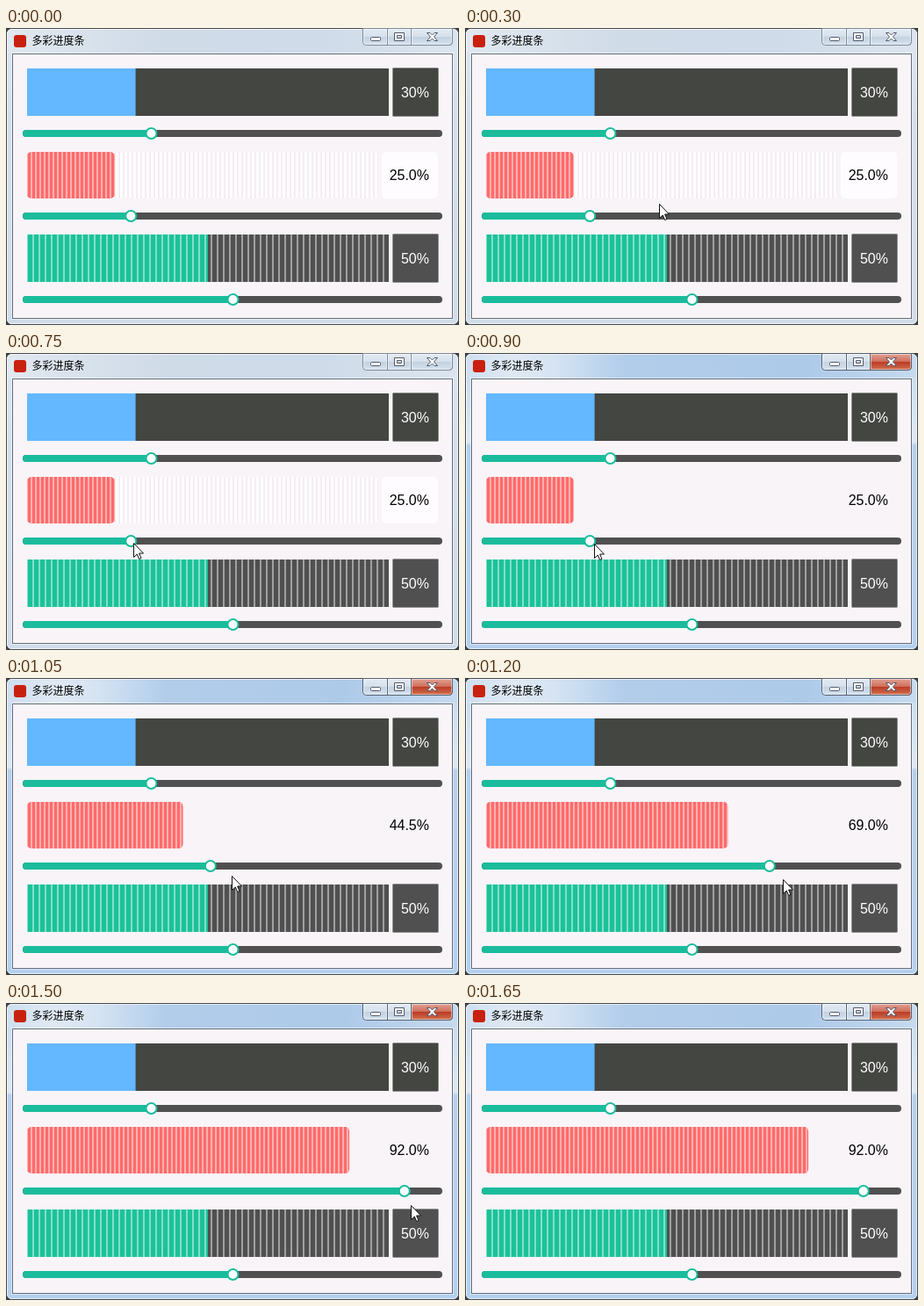
Recreate the animation shown at these times as an HTML page. Size 516 px wide and 338 px high, loop 2.1 s.

```html
<!DOCTYPE html>
<html lang="zh">
<head>
<meta charset="utf-8">
<style>
html, body { margin: 0; width: 516px; height: 338px; overflow: hidden; background: #3a3c40; }
svg { display: block; }
.pct { font: 16px "Liberation Sans", Arial, sans-serif; text-anchor: end; }
.title { font: 12px "Noto Sans CJK SC", "Noto Sans CJK", sans-serif; }
</style>
</head>
<body>
<svg width="516" height="338" viewBox="0 0 516 338">
  <defs>
    <linearGradient id="idleSide" x2="0" y2="1">
      <stop stop-color="#dde7f1"/><stop offset=".3" stop-color="#d3dfeb"/><stop offset="1" stop-color="#d0dde9"/>
    </linearGradient>
    <linearGradient id="idleTop">
      <stop stop-color="#e0e8f0"/><stop offset=".35" stop-color="#d0dbe8"/>
      <stop offset=".7" stop-color="#cfdbe9"/><stop offset="1" stop-color="#dce5ef"/>
    </linearGradient>
    <linearGradient id="activeSide" x2="0" y2="1">
      <stop stop-color="#c5d9ee"/><stop offset=".3" stop-color="#dce8f5"/>
      <stop offset=".31" stop-color="#b6d0ec"/><stop offset="1" stop-color="#b4d0ee"/>
    </linearGradient>
    <linearGradient id="activeTop">
      <stop stop-color="#cfdff0"/><stop offset=".1" stop-color="#dfe9f4"/><stop offset=".2" stop-color="#d5e3f2"/>
      <stop offset=".35" stop-color="#b2cdea"/><stop offset=".75" stop-color="#adcae9"/><stop offset="1" stop-color="#c6daef"/>
    </linearGradient>
    <linearGradient id="button" x2="0" y2="1">
      <stop stop-color="#e3ebf4"/><stop offset=".5" stop-color="#d5e0ec"/>
      <stop offset=".5" stop-color="#c3d1e0"/><stop offset="1" stop-color="#d6e2ef"/>
    </linearGradient>
    <linearGradient id="closeRed" x2="0" y2="1">
      <stop stop-color="#e2a497"/><stop offset=".48" stop-color="#cf6e5c"/>
      <stop offset=".5" stop-color="#b93a25"/><stop offset="1" stop-color="#d4714f"/>
    </linearGradient>
    <pattern id="fine" x="28" width="5" height="60" patternUnits="userSpaceOnUse">
      <rect width="2" height="60" fill="#ffb0b0"/>
    </pattern>
    <pattern id="fineGray" x="28" width="5" height="60" patternUnits="userSpaceOnUse">
      <rect width="2" height="60" fill="#f3eef2"/>
    </pattern>
    <pattern id="wide" x="30" width="7" height="60" patternUnits="userSpaceOnUse">
      <rect width="2" height="60" fill="#fff" opacity=".46"/>
    </pattern>
  </defs>

  <rect id="glass" x=".5" y=".5" width="515" height="337" rx="6" stroke="#42474f"/>
  <rect id="titleBar" x="2" y="2" width="512" height="27" rx="4"/>
  <rect x="1.5" y="1.5" width="513" height="335" rx="5" fill="none" stroke="#fff" opacity=".65"/>
  <rect x="6.5" y="28.5" width="503" height="303" fill="none" stroke="#fff" opacity=".5"/>
  <rect x="7.5" y="29.5" width="501" height="301" fill="#f9f4f8" stroke="#636d79"/>
  <rect x="9" y="8" width="14" height="14" rx="3" fill="#c9210f"/>
  <text class="title" x="29.500" y="19">多彩进度条</text>

  <path id="buttons" d="M406.500 .5V15.500Q406.500 19.500 410.500 19.500H504.500Q508.500 19.500 508.500 15.500V.5Z" fill="url(#button)"/>
  <path id="close" d="M461.500 .5H508.500V15.500Q508.500 19.500 504.500 19.500H461.500Z"/>
  <path id="divider" d="M434.500 1V19M461.500 1V19"/>
  <g fill="none" stroke="#fff" opacity=".5">
    <path d="M407.500 1.500H433.500V18.500H410.500Q407.500 18.500 407.500 15.500Z"/>
    <path d="M435.500 1.500H460.500V18.500H435.500Z"/>
    <path d="M462.500 1.500H507.500V15.500Q507.500 18.500 504.500 18.500H462.500Z"/>
  </g>
  <g fill="#fff" stroke="#53596a">
    <rect x="415.500" y="10.500" width="11" height="4" rx="1"/>
    <path d="M442.500 5.500h11v9h-11zM445.500 8.500h5v3h-5z" fill-rule="evenodd"/>
    <path d="M479.500 5.500h3.500l2.500 2.500 2.500-2.500h3.500l-4 4.500 4 4.500h-3.500l-2.500-2.500-2.500 2.500h-3.500l4-4.500z"/>
  </g>

  <rect x="24" y="46" width="412" height="54" fill="#444642"/>
  <rect x="24" y="46" width="123.600" height="54" fill="#64b8ff"/>
  <rect x="440.500" y="45.500" width="52" height="55" rx="1" fill="#444642" stroke="#8e8f8c"/>

  <g id="pale">
    <rect x="24" y="141" width="400" height="53" rx="5" fill="#fffcff"/>
    <rect x="24" y="141" width="400" height="53" rx="5" fill="url(#fineGray)"/>
    <rect x="428" y="141" width="64" height="53" rx="5" fill="#fffcff"/>
  </g>
  <rect class="fill" x="24" y="141" height="53" rx="5" fill="#ff6b6b"/>
  <rect class="fill" x="24" y="141" height="53" rx="5" fill="url(#fine)"/>

  <rect x="24" y="235" width="412" height="54" fill="#505050"/>
  <rect x="24" y="235" width="206" height="54" fill="#1cc29a"/>
  <rect x="24" y="235" width="412" height="54" fill="url(#wide)"/>
  <rect x="440.500" y="234.500" width="52" height="55" rx="1" fill="#505050" stroke="#929292"/>

  <text class="pct" x="482" y="79" fill="#fff">30%</text>
  <text class="pct" x="482" y="173" id="value"></text>
  <text class="pct" x="482" y="268" fill="#fff">50%</text>

  <g id="sliders"></g>
  <path id="cursor" d="M.5 .5V16.500L4.300 13L6.700 18.500L9 17.500L6.600 12H11.500Z" fill="#fff" stroke="#111"/>
</svg>
<script>
const $ = id => document.getElementById(id);
const STEP = 150, LOOP = 2100;

// One entry per step: bar value, then the pointer tip when visible
const steps = [
  [25], [25, 430, 174], [25, 221, 200], [25, 165, 205], [25, 148, 215], [25, 145, 216],
  [25, 147, 217], [44.5, 257, 225], [69, 362, 229], [91, 455, 230], [92, 461, 230], [92]
];

function addSlider(y) {
  const group = document.createElementNS('http://www.w3.org/2000/svg', 'g');
  group.innerHTML = `<rect x="19" y="${y - 4}" width="478" height="8" rx="4" fill="#505050"/>
    <rect x="19" y="${y - 4}" height="8" rx="4" fill="#1abc9c"/>
    <circle cy="${y}" r="6" fill="#fff" stroke="#1abc9c" stroke-width="2"/>`;
  $('sliders').append(group);
  return value => {
    const x = 26 + 4.65 * value;
    group.children[1].setAttribute('width', x - 19);
    group.children[2].setAttribute('cx', x);
  };
}

addSlider(120)(30);
const setSlider = addSlider(214);
addSlider(309)(50);

function draw(time) {
  const index = Math.min(Math.floor(time % LOOP / STEP), steps.length - 1);
  const [value, x, y] = steps[index];
  const active = index >= 6;
  const state = active ? 'active' : 'idle';

  $('glass').setAttribute('fill', `url(#${state}Side)`);
  $('titleBar').setAttribute('fill', `url(#${state}Top)`);
  $('close').setAttribute('fill', active ? 'url(#closeRed)' : 'none');
  for (const id of ['buttons', 'close', 'divider']) $(id).setAttribute('stroke', active ? '#566273' : '#7d8a99');
  $('pale').style.display = active ? 'none' : '';

  setSlider(value);
  $('value').textContent = value.toFixed(1) + '%';
  for (const bar of document.querySelectorAll('.fill')) bar.setAttribute('width', 3.99 * value);

  $('cursor').style.display = x === undefined ? 'none' : '';
  if (x !== undefined) $('cursor').setAttribute('transform', `translate(${x} ${y})`);
}

const start = performance.now();
function tick() {
  draw(performance.now() - start);
  requestAnimationFrame(tick);
}
tick();
</script>
</body>
</html>
```
